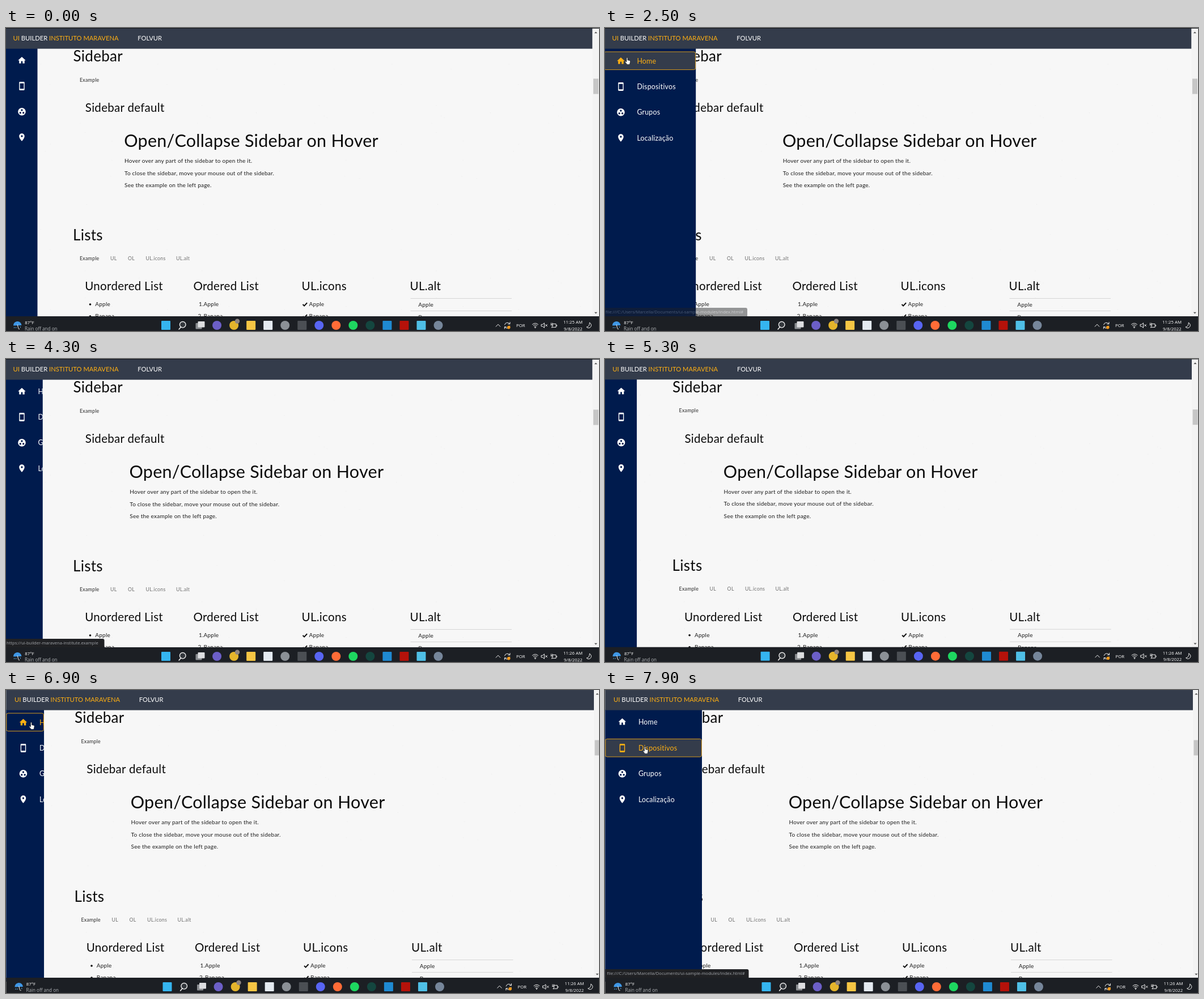
These frames come from a looping animation (1046x535 px, 8000 ms). An HTML page:

```html
<!DOCTYPE html>
<html lang="en">
<head>
<meta charset="utf-8">
<title>Sidebar demo</title>
<style>
html, body { margin: 0; width: 100%; height: 100%; overflow: hidden; background: #e6e4d0; }
svg { display: block; width: 1046px; height: 535px; }
text { font-family: Lato, sans-serif; fill: #0b0b0b; white-space: pre; }
.h1 { font-size: 30.5px; letter-spacing: .27px; }
.h2 { font-size: 26px; letter-spacing: .3px; }
.h3 { font-size: 20.5px; letter-spacing: .3px; }
.p { font-size: 10px; letter-spacing: .23px; fill: #1c1c1c; }
.tab { font-size: 8.8px; letter-spacing: .25px; fill: #707070; }
.tab.on { fill: #2a2a2a; }
.nav { font-size: 11.2px; fill: #fff; }
.gold { fill: #ffb013; }
.label { font-size: 12.4px; letter-spacing: .2px; fill: inherit; }
.sys { font-family: "Open Sans", sans-serif; font-size: 7.8px; fill: #fff; }
.status { font-family: "Open Sans", sans-serif; font-size: 7.6px; fill: #a2a6ab; }
.line { fill: none; stroke: #eee; stroke-width: 1; stroke-linecap: round; stroke-linejoin: round; }
</style>
</head>
<body>
<svg viewBox="0 0 1046 535">
  <defs>
    <pattern id="specks" width="206.5" height="292" patternUnits="userSpaceOnUse"></pattern>
    <clipPath id="clip"><rect id="clipBox" x="-3" y="36" height="480"/></clipPath>
  </defs>
  <g id="camera">
    <rect x="-2.2" width="1060" height="545" fill="#f7f7f7"/>
    <rect x="56" y="37" width="978" height="472" fill="url(#specks)"/>
    <g id="page"></g>
    <g id="copy"></g>
    <path d="M713.5 477.5H892M713.5 499.5H892" stroke="#d6d6d6"/>
    <circle cx="148.5" cy="488" r="1.8"/><circle cx="148.5" cy="509" r="1.8"/>
    <path d="M523.5 488l2.6 2.6 5-5.4M523.5 509l2.6 2.6 5-5.4" fill="none" stroke="#111" stroke-width="2"/>

    <rect id="side" x="-2.2" y="36" height="480" fill="#001b4d"/>
    <g id="menu" clip-path="url(#clip)">
      <rect id="hover" x="-1.7" height="31.6" rx="3" fill="#343c4b" stroke="#d99a1c"/>
    </g>

    <rect x="-2.2" width="1060" height="1.2" fill="#15181d"/>
    <rect x="-2.2" y="1" width="1036.7" height="35.6" fill="#343c4b"/>
    <text class="nav" x="12.6" y="22.2"><tspan class="gold">UI </tspan>BUILDER<tspan class="gold"> INSTITUTO MARAVENA</tspan></text>
    <text class="nav" x="232.3" y="22.2">FOLVUR</text>

    <rect x="1034.5" y="1" width="24" height="508" fill="#f3f3f3"/>
    <rect x="1036" y="89.5" width="9" height="27" fill="#c6c6c6"/>
    <path d="M1037.8 9.2l2.6-2.8 2.6 2.8zM1037.8 501.8l2.6 2.8 2.6-2.8z" fill="#555"/>

    <g id="status">
      <path id="bubble" fill="#202124"/>
      <text id="address" class="status" x="1" y="504.3"></text>
    </g>

    <rect x="-2.2" y="509" width="1060" height="36" fill="#1c1f24"/>
    <path d="M13 525.5a7.2 7.2 0 0 1 13.8-3.2l.6 2.6z" fill="#3f97e6"/>
    <path d="M20.3 524l1.6 6.6q.6 2 2 .8" class="line" stroke-width="1.2"/>
    <path d="M15 528l-.8 2M18 528l-.8 2M25 527l.6 2" stroke="#5bb4f2" fill="none"/>
    <text class="sys" x="33.3" y="523">87°F</text>
    <text class="sys" x="33" y="534" style="font-size:8.1px;fill:#b4b7ba">Rain off and on</text>
    <g id="apps"></g>
    <circle cx="311.7" cy="523.8" r="5.3" class="line" style="fill:#34383d;stroke-width:1.4"/>
    <path d="M309.3 528l-3.6 4.2" transform="translate(-.6 -.2)" class="line" style="stroke-width:1.6"/>
    <rect x="334.5" y="521" width="11" height="10.5" rx="1" fill="#8a8d91"/>
    <rect x="338.5" y="518" width="12" height="10.5" rx="1" fill="#dcdde0"/>
    <circle cx="408" cy="517.7" r="4.2" fill="#8f8580"/>

    <path class="line" d="M864.2 527.2l3.8-4 3.8 4"/>
    <path class="line" d="M879.6 524a5 5 0 0 1 9-1.6M889 519.5v3.2h-3.2M888.8 526a5 5 0 0 1-9 2M879.4 531v-3.2h3.2"/>
    <circle cx="886.8" cy="528.6" r="2.8" fill="#f59a1b"/>
    <text class="sys" x="900" y="528.2">POR</text>
    <path class="line" d="M928.5 523.4q5-4.4 10 0M930.2 525.4q3.3-2.9 6.6 0M931.9 527.4q1.6-1.4 3.2 0"/>
    <circle cx="933.5" cy="529" r="1" fill="#eee"/>
    <path class="line" d="M944.5 523.4h2l3-2.6v8.6l-3-2.6h-2zM951.6 523.6l3 3M954.6 523.6l-3 3"/>
    <path class="line" d="M963.5 522.4h6.6v6h-6.6M971.6 524.4v2M961.6 521v3.4M964 521v3.4M961.2 524.4h3.2v2l-1.6 1v1.6"/>
    <text id="clock" class="sys" x="1017" y="522.4" text-anchor="end"></text>
    <text class="sys" x="1016.6" y="533.6" text-anchor="end">9/8/2022</text>
    <path class="line" d="M1029.4 520.4a4.8 4.8 0 1 1-5.4 7.6q5.4-.6 5.4-7.6z"/>

    
  </g>
  <path id="arrow" d="M0 0v10.2l2.4-2.2 1.7 3.7 1.7-.8-1.7-3.5h3.2z" fill="#fff" stroke="#222" stroke-width=".7"/>
  <path id="hand" d="M3 1.2q1.1-1.2 2 0v4l3.6.7q1.2.4 1 1.8l-.7 3.6-.7 1.6H4L.5 8.6q-.4-1.5 1-1.2l1.5 1.2z" fill="#fff" stroke="#222" stroke-width=".7"/>
</svg>
<script>
const LOOP = 8000, STEP = 100, CLOSED = 55.5, TRAVEL = 113, FADE = 500;
const $ = id => document.getElementById(id);

function add(parent, tag, attrs, text) {
  const el = document.createElementNS('http://www.w3.org/2000/svg', tag);
  for (const k in attrs) el.setAttribute(k, attrs[k]);
  if (text) el.textContent = text;
  parent.append(el);
  return el;
}
const write = (parent, cls, x, y, text) => add(parent, 'text', { class: cls, x, y }, text);

// Page text
const page = $('page'), copy = $('copy');
write(page, 'h2', 118.5, 59.3, 'Sidebar');
write(page, 'tab on', 130, 94.6, 'Example');
write(page, 'h3', 139.8, 148.3, 'Sidebar default');
write(page, 'h2', 118, 374.5, 'Lists');
[[130, 'Example'], [184, 'UL'], [215, 'OL'], [246.5, 'UL.icons'], [300, 'UL.alt']]
  .forEach(([x, s], i) => write(page, i ? 'tab' : 'tab on', x, 409.5, s));
['Unordered List', 'Ordered List', 'UL.icons', 'UL.alt']
  .forEach((s, i) => write(page, 'h3', 139.3 + 191.1 * i, 463.3, s));
['Apple', 'Banana'].forEach((s, i) => {
  const y = 491.3 + 21 * i;
  [157.3, 348.5, 534.6].forEach(x => write(page, 'p', x, y, s));
  write(page, 'p', i ? 338.4 : 340, y, i + 1 + '.');
  write(page, 'p', 727.3, y + .5 + i, s);
});
write(copy, 'h1', 208.2, 210.3, 'Open/Collapse Sidebar on Hover');
['Hover over any part of the sidebar to open the it.',
 'To close the sidebar, move your mouse out of the sidebar.',
 'See the example on the left page.'
].forEach((s, i) => write(copy, 'p', 209, 238 + 21.6 * i, s));

// Faint paper texture
let seed = 7;
const rnd = () => (seed = seed * 16807 % 2147483647) / 2147483647;
for (let i = 0; i < 16; i++)
  add($('specks'), 'circle', { cx: 4 + rnd() * 198, cy: 4 + rnd() * 284, r: .6, fill: '#e9e9e9' });

// Menu
const items = [
  ['Home', 'M10 20v-6h4v6h5v-8h3L12 3 2 12h3v8z'],
  ['Dispositivos', 'M17 1H7c-1.1 0-2 .9-2 2v18c0 1.1.9 2 2 2h10c1.1 0 2-.9 2-2V3c0-1.1-.9-2-2-2zm0 18H7V5h10z'],
  ['Grupos', 'M12 2a10 10 0 1 0 0 20a10 10 0 1 0 0-20zM8 17.5a2.5 2.5 0 1 1 0-5a2.5 2.5 0 0 1 0 5zM9.5 8a2.5 2.5 0 1 1 5 0a2.5 2.5 0 0 1-5 0zM16 17.5a2.5 2.5 0 1 1 0-5a2.5 2.5 0 0 1 0 5z'],
  ['Localização', 'M12 2C8.1 2 5 5.1 5 9c0 5.3 7 13 7 13s7-7.7 7-13c0-3.9-3.1-7-7-7zm0 9.5a2.5 2.5 0 1 1 0-5a2.5 2.5 0 0 1 0 5z']
].map(([name, d], i) => {
  const g = add($('menu'), 'g', {});
  add(g, 'path', { d, 'fill-rule': 'evenodd', transform: 'translate(19.8 -8.2) scale(.68)' });
  write(g, 'label', 56.4, i ? 4.6 : 4.4, name);
  return g;
});

// Taskbar: [slot, colour, round]
[[0, '#35b5f0'], [3, '#6c5fc7', 1], [4, '#e5b52c', 1], [5, '#f6c644'], [6, '#e4eaf0'],
 [7, '#8b9096', 1], [8, '#4b4f54'], [9, '#5865f2', 1], [10, '#ff6c37', 1], [11, '#1ed760', 1],
 [12, '#14463f', 1], [13, '#1f8ad2'], [14, '#b5120a'], [15, '#4fbfe6'], [16, '#76869a', 1]
].forEach(([slot, fill, round]) => add($('apps'), 'rect', {
  x: 274 + 30.03 * slot, y: 517, width: 16, height: 16, rx: round ? 8 : 1, fill
}));

// Timelines: each row holds until the next one starts
const camera = [[0, 0, 0], [5300, .6, -.3], [5400, 1.2, -.6], [5600, 3, -1], [5700, 4.5, -1],
  [6000, 3.8, -1], [6100, 3.1, -1], [6200, 2.5, -1]];
const pointer = [[0], [600, 'arrow', 25, 6], [700, 'arrow', 26, 18], [800, 'arrow', 28, 33],
  [900, 'arrow', 30, 48], [1000, 'arrow', 31, 62], [1100],
  [1600, 'arrow', 262, 150], [1700, 'arrow', 143.5, 80], [1800, 'arrow', 78, 62],
  [1900, 'hand', 35, 54], [2100, 'hand', 35, 51.5], [3000, 'hand', 36, 51.5], [3100, 'hand', 37, 51.5],
  [4000, 'hand', 44, 12], [4100],
  [6700, 'arrow', 235, 262], [6800, 'arrow', 96, 104], [6900, 'hand', 40.5, 56.5],
  [7200, 'hand', 43, 61], [7300, 'hand', 48, 70], [7400, 'hand', 54, 80], [7500, 'hand', 60, 90],
  [7600, 'hand', 64, 96], [7700, 'hand', 66.5, 99.5]];
const hovers = [[0, -1], [2100, 0], [4000, -1], [6900, 0], [7500, 1]];
const slides = [[0, 0], [2165, 1], [3973, 0], [6855, 1]];
const url = (scheme, path) => scheme + '://' + path;
const local = [url('file', '/C:/Users/Marcella/Documents/ui-sample-modules/index.html#'), 251];
const remote = [url('https', 'ui-builder-maravena-institute.example'), 173.5];

const at = (rows, t) => rows.filter(r => r[0] <= t).pop();
const clamp = v => Math.max(0, Math.min(1, v));

// CSS "ease": cubic-bezier(.25, .1, .25, 1)
function ease(p) {
  let lo = 0, hi = 1, u = p;
  for (let i = 0; i < 24; i++) {
    u = (lo + hi) / 2;
    const x = .75 * u * (1 - u) ** 2 + .75 * u * u * (1 - u) + u ** 3;
    if (x < p) lo = u; else hi = u;
  }
  return .3 * u * (1 - u) ** 2 + 3 * u * u * (1 - u) + u ** 3;
}

function drawMenu(t) {
  const [began, open] = at(slides, t);
  const p = began ? ease(clamp((t - began) / FADE)) : 0;
  const shift = TRAVEL * (open ? p : began ? 1 - p : 0);
  const right = CLOSED + shift;
  $('side').setAttribute('width', right + 2.2);
  $('clipBox').setAttribute('width', right + 3);
  copy.setAttribute('transform', `translate(${shift} 0)`);

  const [since, active] = at(hovers, t);
  const box = $('hover');
  box.style.display = active < 0 ? 'none' : '';
  box.setAttribute('y', 42 + 45.4 * active);
  box.setAttribute('width', right + 1.1);
  box.setAttribute('fill-opacity', ease(clamp((t - since) / 400)));
  items.forEach((g, i) => {
    const nudge = active >= 0 && i >= active ? 1 : 0;
    g.setAttribute('transform', `translate(0 ${57.2 + 45.3 * i + nudge})`);
    g.setAttribute('fill', i === active ? '#ffb013' : '#fff');
  });
}

function drawStatus(t) {
  const [text, w] = t >= 4000 && t < 6000 ? remote : local;
  const alpha = t < 4000 ? clamp((t - 2400) / 220)
    : t < 6000 ? clamp((4500 - t) / 200) : clamp((t - 7200) / 220);
  $('status').setAttribute('opacity', alpha);
  $('address').textContent = text;
  $('bubble').setAttribute('d', `M-2.2 494H${w - 3}q3 0 3 3v13H-2.2z`);
}

function draw(ms) {
  let t = Math.floor(ms % LOOP / STEP) * STEP;
  if (t === 7100) t = 7000;
  const [, cx, cy] = at(camera, t);
  $('camera').setAttribute('transform', `translate(${cx} ${cy})`);
  drawMenu(t);
  drawStatus(t);
  $('clock').textContent = t < 3500 ? '11:25 AM' : '11:26 AM';
  const [, kind, x, y] = at(pointer, t);
  for (const id of ['arrow', 'hand']) {
    $(id).style.display = id === kind ? '' : 'none';
    if (id === kind) $(id).setAttribute('transform', `translate(${x} ${y})`);
  }
}

const start = performance.now();
(function tick() {
  draw(performance.now() - start);
  requestAnimationFrame(tick);
})();
</script>
</body>
</html>
```
